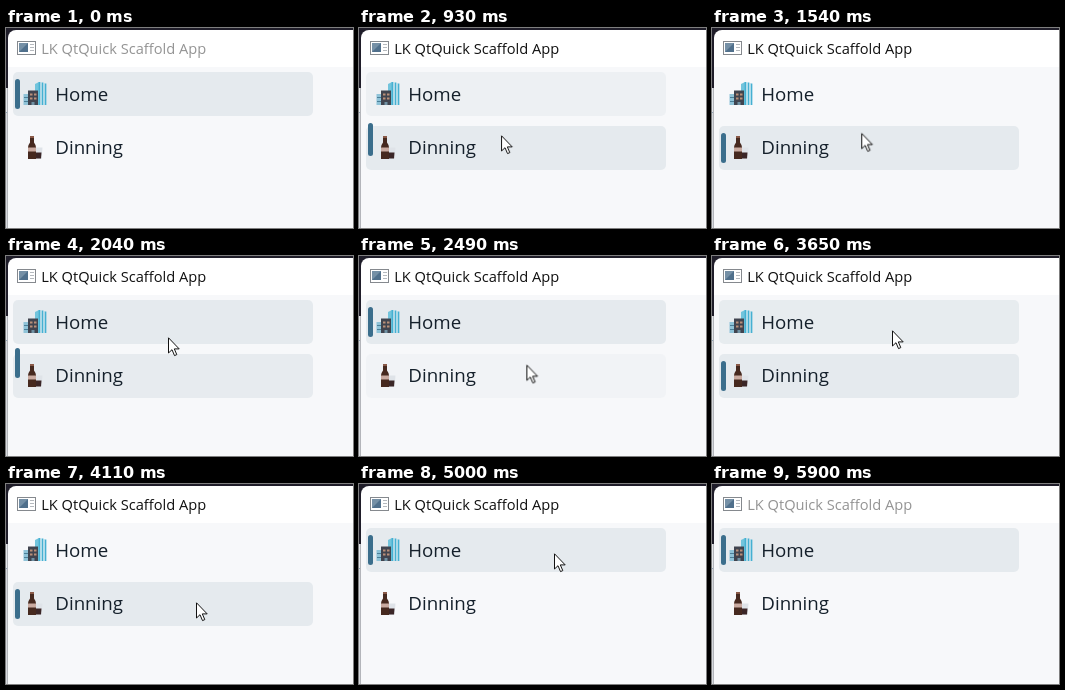
Write an HTML page that moves like this. It is 347 by 200 pixels and loops after 5.96 s.

```html
<!DOCTYPE html>
<html lang="en">
<head>
<meta charset="utf-8">
<title>Scaffold App</title>
<style>
  html, body { margin: 0; width: 100%; height: 100%; overflow: hidden; background: #1f1d29; }
  #stage { position: absolute; left: 0; top: 0; width: 347px; height: 200px; overflow: hidden; }
  #stage > * { position: absolute; }
  svg { left: 0; top: 0; display: block; overflow: visible; }

  .edge { left: 0; top: 60px; width: 2px; height: 140px; background: linear-gradient(#e4e6ea 24px, #8fa3b5 24px 25px, #d5d8dd 25px); border-right: 1px solid #b3b5ba; box-sizing: border-box; }
  .window { left: 2px; top: 2px; width: 353px; height: 210px; border-radius: 8px 0 0 0; background: linear-gradient(#fff 37px, #f7f8fa 37px); }

  text { font-family: "Open Sans", "Noto Sans", sans-serif; font-variant-ligatures: none; }
  .title { font-size: 14.65px; }
  .label { font-size: 18.7px; fill: #15202b; }

  .row { left: 7px; width: 300px; height: 44px; border-radius: 5px; background: #e5eaee; }
  #home { top: 44px; }
  #dining { top: 98px; }
  #bar { left: 9px; width: 5px; border-radius: 2.5px; background: #3b6e8c; }

  .title, .row, #bar, #cursor { animation: 5960ms linear infinite; }
  .title { animation-name: title; animation-timing-function: step-end; }
  #home { animation-name: home; }
  #dining { animation-name: dining; }
  #bar { animation-name: barTop, barBottom; }
  #cursor { animation-name: cursor; }

  @keyframes title {
    0%, 98.993% { fill: #949494; }
    13.591% { fill: #111; }
  }

  /* Row tint: 1 selected, .85 hovered */
  @keyframes home {
    0%, 13.758% { opacity: 1; }
    17.785%, 29.866% { opacity: 0; }
    32.383% { opacity: .85; }
    35.235%, 50.839% { opacity: 1; }
    54.866%, 58.389% { opacity: 0; }
    60.403%, 63.758% { opacity: .85; }
    66.443%, 75.168% { opacity: 0; }
    77.181% { opacity: .85; }
    79.195%, 100% { opacity: 1; }
  }
  @keyframes dining {
    0%, 6.711% { opacity: 0; }
    8.725%, 13.758% { opacity: .85; }
    15.604%, 33.725% { opacity: 1; }
    37.752%, 41.107% { opacity: 0; }
    43.121%, 50.839% { opacity: .85; }
    52.013%, 77.852% { opacity: 1; }
    81.879%, 86.242% { opacity: 0; }
    87.919% { opacity: .7; }
    90.604%, 100% { opacity: 0; }
  }

  /* The top edge glides while the bottom edge overshoots */
  @keyframes barTop {
    0%, 14.195%, 38.993%, 50.839%, 82.886%, 100% { top: 51px; animation-timing-function: cubic-bezier(.22, 1, .36, 1); }
    19.228%, 33.96%, 55.872%, 77.852% { top: 105px; animation-timing-function: cubic-bezier(.22, 1, .36, 1); }
  }
  @keyframes barBottom {
    0%, 14.195%, 38.993%, 50.839%, 82.886%, 100% { bottom: 119px; animation-timing-function: cubic-bezier(.34, 1.56, .64, 1); }
    19.228%, 33.96%, 55.872%, 77.852% { bottom: 65px; animation-timing-function: cubic-bezier(.34, 1.56, .64, 1); }
  }

  @keyframes cursor {
    0%, 2.685% { transform: translate(168px, 202px); animation-timing-function: ease-out; }
    10.906%, 15.604% { transform: translate(142px, 107px); }
    18.456%, 21.98% { transform: translate(144px, 106px); }
    22.483%, 25.168% { transform: translate(149px, 105px); animation-timing-function: ease-in-out; }
    32.886%, 39.094% { transform: translate(162px, 81px); animation-timing-function: ease-in-out; }
    43.96%, 46.644% { transform: translate(171px, 127px); }
    47.315%, 55.369% { transform: translate(173px, 119px); animation-timing-function: ease-in-out; }
    60.57%, 61.242% { transform: translate(180px, 74px); animation-timing-function: ease-in-out; }
    68.96%, 73.154% { transform: translate(190px, 118px); animation-timing-function: ease-in-out; }
    77.517%, 83.893% { transform: translate(195px, 69px); animation-timing-function: ease-in; }
    91.611%, 100% { transform: translate(248px, 203px); }
  }
</style>
</head>
<body>
<div id="stage">
  <div class="edge"></div>
  <div class="window"></div>
  <div id="home" class="row"></div>
  <div id="dining" class="row"></div>
  <div id="bar"></div>

  <svg width="347" height="200" viewBox="0 0 347 200">
    <!-- window icon -->
    <rect x="11.5" y="13.5" width="18" height="13" fill="#fff" stroke="#85898e"/>
    <rect x="13" y="15" width="9" height="9" fill="#50708c"/>
    <path d="M13 24V15h9z" fill="#7590a6"/>
    <path d="M24 16.5h4M24 19.5h4M24 22.5h4" stroke="#b5b9be"/>

    <!-- buildings -->
    <path d="M29 56l4-2v23h-4z" fill="#72c4dc"/>
    <path d="M33.5 54v23M36.5 54.500v22.500M39.500 55.500v21.500" stroke="#45b0d2" stroke-width="1.700"/>
    <path d="M35 54.500v22.500M38 55v22" stroke="#a9dbe9"/>
    <path d="M17.500 66h6v11h-6z" fill="#8fc3d8"/>
    <path d="M18 69.500h5M18 73.500h5" stroke="#4b7f98"/>
    <path d="M22 62.500h10V77H22z" fill="#40444f"/>
    <path d="M24 66.500h2.500m1.500 0h2.500M24 70.500h2.500m1.500 0h2.500" stroke="#b98f79" stroke-width="1.800"/>
    <path d="M25.500 74h3v3h-3z" fill="#6f91a3"/>

    <!-- bottle and glass -->
    <path d="M28.500 119.500h8l-1 11.500h-6z" fill="#dfe3e8"/>
    <path d="M29 124.500h6.500l-.5 6h-5.500z" fill="#3b2627"/>
    <path d="M24 108h4v6.500q2 2.500 2 5V131h-8v-11.500q0-2.500 2-5z" fill="#46291f"/>
    <path d="M24 108h4v2h-4z" fill="#8a5a48"/>
    <path d="M22 119.500h8v4h-8z" fill="#c9aaa0"/>

    <text class="title" x="35.200" y="26">LK QtQuick Scaffold App</text>
    <text class="label" x="49.300" y="73">Home</text>
    <text class="label" x="49.300" y="126">Dinning</text>
  </svg>

  <svg id="cursor" width="12" height="20" viewBox="0 0 12 20">
    <path d="M.5 .8V16l3.500-3.300 2.500 5.900 2.300-1-2.500-5.700h4.900z" fill="#fff" stroke="#111"/>
  </svg>
</div>
</body>
</html>
```
